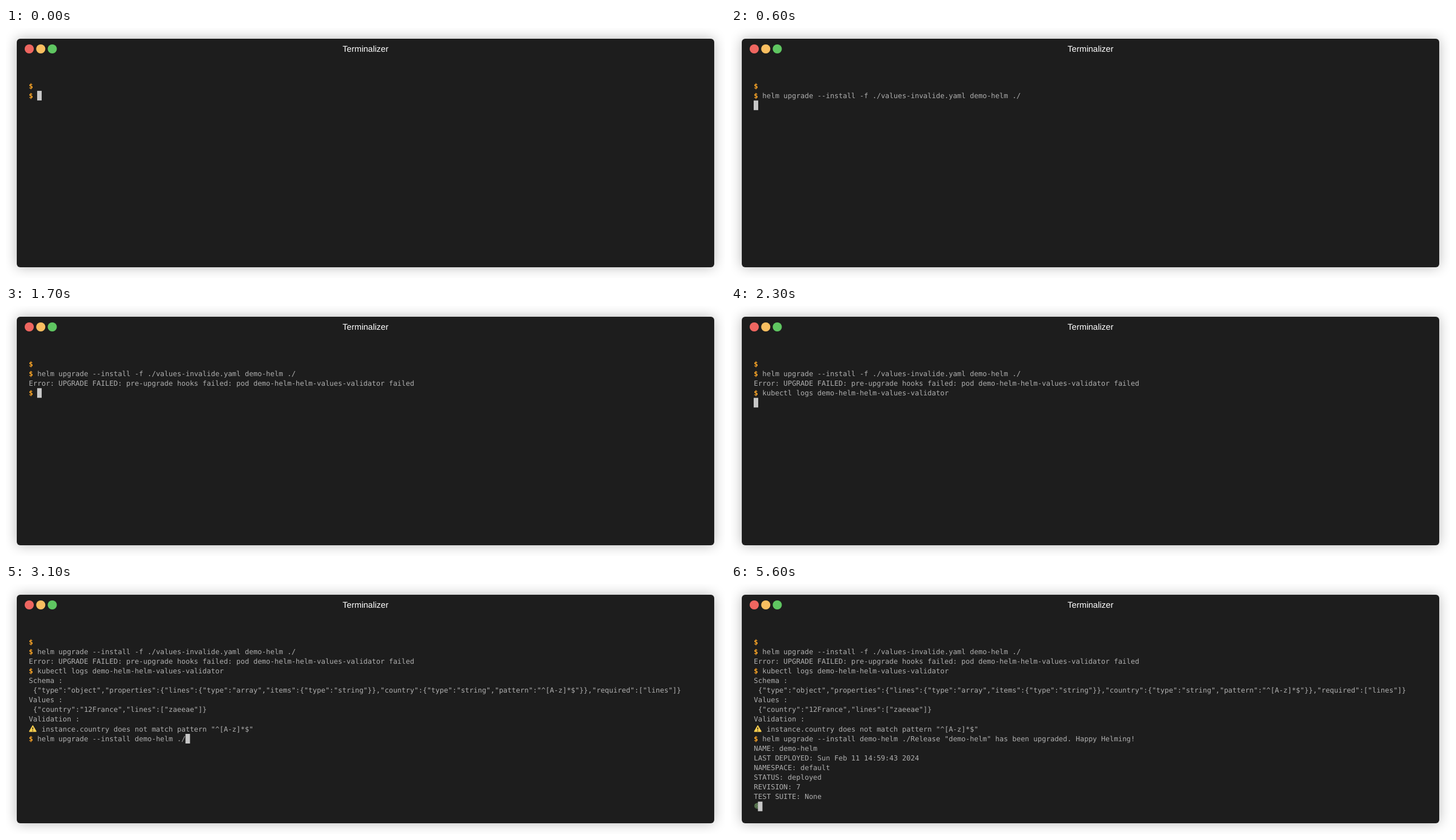
Recreate the animation shown at these times as an HTML page. Size 1268 px wide and 442 px high, loop 5.7 s.

```html
<!DOCTYPE html>
<html lang="en">
<head>
<meta charset="utf-8">
<title>Terminal</title>
<style>
  html, body {
    margin: 0;
    width: 100%;
    height: 100%;
    overflow: hidden;
    background: #fff;
  }

  .window {
    position: absolute;
    left: 19px;
    top: 19px;
    width: 1230px;
    height: 404px;
    border-radius: 6px;
    background: #1d1d1d;
    box-shadow: 0 0 22px rgba(0, 0, 0, .28);
  }

  svg {
    position: absolute;
    left: 0;
    top: 0;
  }

  .title {
    font: 15px "Liberation Sans", Arial, sans-serif;
    fill: #fff;
    text-anchor: middle;
    text-rendering: geometricPrecision;
  }

  .screen {
    --w: 7.473px;
    --h: 17.1px;
    position: absolute;
    left: 40.3px;
    top: 93.7px;
    margin: 0;
    font: 12.413px/17.1px "DejaVu Sans Mono", monospace;
    color: #afafaf;
    white-space: pre;
    text-rendering: geometricPrecision;
    font-variant-ligatures: none;
  }

  b { color: #ffa727; }

  .cursor {
    position: absolute;
    left: 0;
    top: 0;
    width: 7.6px;
    height: 17.1px;
    background: #c7c7c7;
    animation: cursor 5.7s step-end infinite;
  }

  .step { animation: 5.7s step-end infinite; }
  .command1 { animation-name: command1; }
  .failure  { animation-name: failure; }
  .prompt2  { animation-name: prompt2; }
  .command2 { animation-name: command2; }
  .logs     { animation-name: logs; }
  .prompt3  { animation-name: prompt3; }
  .command3 { animation-name: command3; }
  .release  { animation-name: release; }
  .finish   { animation-name: finish; }

  @keyframes command1 { 0% { opacity: 0 } 8.771%, 100% { opacity: 1 } }
  @keyframes failure  { 0% { opacity: 0 } 28.07%, 100% { opacity: 1 } }
  @keyframes prompt2  { 0% { opacity: 0 } 29.824%, 100% { opacity: 1 } }
  @keyframes command2 { 0% { opacity: 0 } 38.596%, 100% { opacity: 1 } }
  @keyframes logs     { 0% { opacity: 0 } 43.859%, 100% { opacity: 1 } }
  @keyframes prompt3  { 0% { opacity: 0 } 45.614%, 100% { opacity: 1 } }
  @keyframes command3 { 0% { opacity: 0 } 54.385%, 100% { opacity: 1 } }
  @keyframes release  { 0% { opacity: 0 } 63.157%, 100% { opacity: 1 } }
  @keyframes finish   { 0% { opacity: 0 } 98.245%, 100% { opacity: 1 } }

  /* Column and row of the cursor */
  @keyframes cursor {
    0%      { transform: translate(calc(2 * var(--w)), var(--h)) }
    8.771%  { transform: translate(calc(63 * var(--w)), var(--h)) }
    10.526% { transform: translate(0, calc(2 * var(--h))) }
    28.07%  { transform: translate(0, calc(3 * var(--h))) }
    29.824% { transform: translate(calc(2 * var(--w)), calc(3 * var(--h))) }
    38.596% { transform: translate(calc(46 * var(--w)), calc(3 * var(--h))) }
    40.35%  { transform: translate(0, calc(4 * var(--h))) }
    43.859% { transform: translate(0, calc(10 * var(--h))) }
    45.614% { transform: translate(calc(2 * var(--w)), calc(10 * var(--h))) }
    54.385% { transform: translate(calc(37 * var(--w)), calc(10 * var(--h))) }
    63.157% { transform: translate(0, calc(17 * var(--h))) }
    98.245%, 100% { transform: translate(var(--w), calc(17 * var(--h))) }
  }
</style>
</head>
<body>
<div class="window"></div>

<svg width="1268" height="442" viewBox="0 0 1268 442">
  <circle cx="41" cy="37" r="8.1" fill="#ee6660"/>
  <circle cx="61.3" cy="37" r="8.1" fill="#f9be60"/>
  <circle cx="81.6" cy="37" r="8.1" fill="#5fc661"/>
  <text class="title" x="634" y="42">Terminalizer</text>
  <g class="step logs">
    <path d="M47.2 250.6 L53 260.6 H41.4 Z" fill="#fccf4f" stroke="#fccf4f" stroke-width="1.6" stroke-linejoin="round"/>
    <path d="M47.2 253.4 V257.2 M47.2 258.8 V260.2" stroke="#2a261c" stroke-width="1.5"/>
  </g>
  <g class="step finish">
    <path d="M48 387 C43.5 386.6 41 389 41 392.4 C41 395.6 44 397.6 48 397.6 Z" fill="#4f6b48"/>
    <path d="M43 390.5 L45 389 M43.5 394 L46.5 391" stroke="#7d9670" stroke-width="1"/>
  </g>
</svg>

<pre class="screen"><b>$</b>
<b>$</b> <span class="step command1">helm upgrade --install -f ./values-invalide.yaml demo-helm ./</span>
<span class="step failure">Error: UPGRADE FAILED: pre-upgrade hooks failed: pod demo-helm-helm-values-validator failed</span>
<b class="step prompt2">$</b> <span class="step command2">kubectl logs demo-helm-helm-values-validator</span>
<span class="step logs">Schema :
 {"type":"object","properties":{"lines":{"type":"array","items":{"type":"string"}},"country":{"type":"string","pattern":"^[A-z]*$"}},"required":["lines"]}
Values :
 {"country":"12France","lines":["zaeeae"]}
Validation :
   instance.country does not match pattern "^[A-z]*$"</span>
<b class="step prompt3">$</b> <span class="step command3">helm upgrade --install demo-helm ./</span><span class="step release">Release "demo-helm" has been upgraded. Happy Helming!
NAME: demo-helm
LAST DEPLOYED: Sun Feb 11 14:59:43 2024
NAMESPACE: default
STATUS: deployed
REVISION: 7
TEST SUITE: None</span><i class="cursor"></i></pre>
</body>
</html>
```
